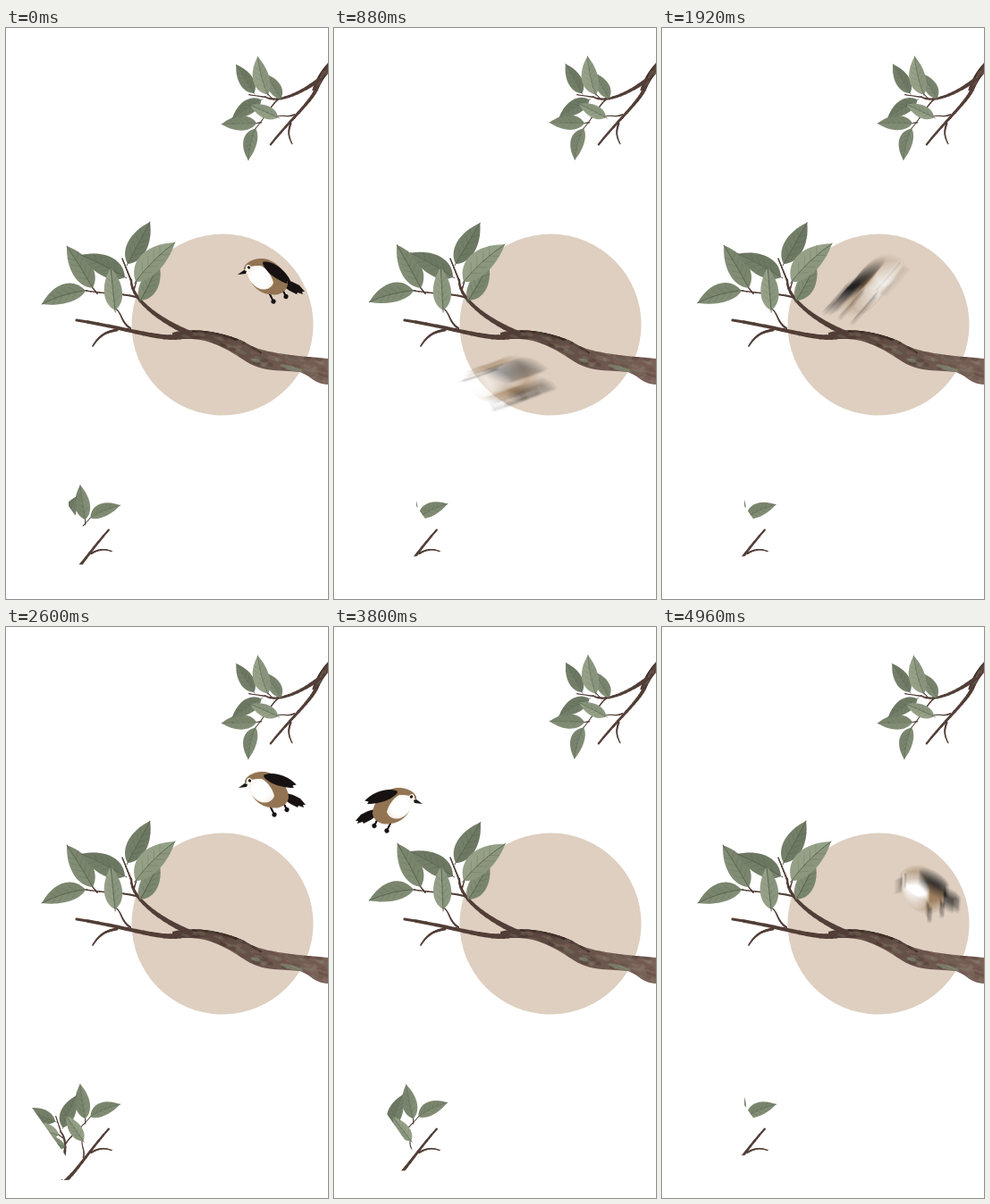
These frames come from a looping animation (360x639 px, 5000 ms). An HTML page with a canvas:

```html
<!DOCTYPE html>
<html lang="en">
<head>
<meta charset="utf-8">
<title>Bird and branches</title>
<style>
html, body { margin: 0; width: 100%; height: 100%; overflow: hidden; background: #fff; }
canvas { display: block; width: 360px; height: 639px; }
</style>
</head>
<body>
<canvas id="stage" width="360" height="639"></canvas>
<script>
const LOOP = 5000, STEP = 40, FLAP = 200, SHUTTER = 20;
const FIRST = 733, CYCLE = 1047, FLIGHT = 240;
const BARK = '#523e37', INK = '#171211';
const GREENS = ['#828d75', '#747f69', '#95a087'];
const ctx = document.getElementById('stage').getContext('2d');

function layer(w, h) {
  const c = document.createElement('canvas');
  c.width = w;
  c.height = h;
  return c.getContext('2d');
}

function fill(g, path, color) {
  g.fillStyle = color;
  g.fill(new Path2D(path));
}

function dot(g, x, y, rx, color, ry = rx) {
  g.fillStyle = color;
  g.beginPath();
  g.ellipse(x, y, rx, ry, .3, 0, 7);
  g.fill();
}

function random(seed) {
  return () => (seed = seed * 16807 % 2147483647) / 2147483647;
}

// Tapering twig: a cubic curve drawn with a shrinking line.
function limb(g, [x0, y0, x1, y1, x2, y2, x3, y3], w0, w1, color = BARK) {
  const n = 14;
  const at = (u, a, b, c, d) => {
    const v = 1 - u;
    return v * v * v * a + 3 * v * u * (v * b + u * c) + u * u * u * d;
  };
  g.strokeStyle = color;
  g.lineCap = 'round';
  for (let i = 0; i < n; i++) {
    g.lineWidth = w0 + (w1 - w0) * i / n;
    g.beginPath();
    for (const u of [i / n, (i + 1) / n]) g.lineTo(at(u, x0, x1, x2, x3), at(u, y0, y1, y2, y3));
    g.stroke();
  }
}

function twig(g, x0, y0, x1, y1, w0, w1, color) {
  limb(g, [x0, y0, x0, y0, x1, y1, x1, y1], w0, w1, color);
}

// base x, base y, tip x, tip y, sideways bend
const LEAVES = [
  [150, 305, 171, 262, 2], [136, 264, 161, 217, 0], [145, 284, 189, 240, -5],
  [97, 291, 68, 244, 1], [133, 279, 84, 254, 2], [122, 316, 117, 268, 0],
  [89, 294, 40, 309, 5]
];

function leaf([bx, by, tx, ty, bend], turn, color) {
  const len = Math.hypot(tx - bx, ty - by), w = len * .21;
  const mid = [len * .5, bend];
  const half = side => {
    const p = new Path2D();
    p.moveTo(0, 0);
    p.bezierCurveTo(len * .18, side * w * 1.35 + bend, len * .62, side * w * 1.3 + bend, len, 0);
    p.quadraticCurveTo(...mid, 0, 0);
    return p;
  };
  const upper = half(-1), lower = half(1);
  ctx.save();
  ctx.translate(bx, by);
  ctx.rotate(Math.atan2(ty - by, tx - bx) + turn);
  ctx.fillStyle = color;
  ctx.fill(upper);
  ctx.fill(lower);
  ctx.fillStyle = 'rgba(50,60,45,.1)';
  ctx.fill(lower);
  ctx.strokeStyle = 'rgba(60,72,54,.35)';
  ctx.lineWidth = .5;
  ctx.beginPath();
  for (let u = .2; u < .8; u += .15) {
    for (const side of [-1, 1]) {
      ctx.moveTo(len * u, bend * 2 * u * (1 - u));
      ctx.lineTo(len * (u + .13), side * w * .6 + bend * .5);
    }
  }
  ctx.stroke();
  ctx.strokeStyle = '#56624e';
  ctx.lineWidth = .9;
  ctx.beginPath();
  ctx.moveTo(-2, 0);
  ctx.quadraticCurveTo(...mid, len, 0);
  ctx.stroke();
  ctx.restore();
}

function leafyFork(sway) {
  limb(ctx, [206, 342, 170, 327, 139, 302, 140, 282], 6, 2);
  twig(ctx, 140, 283, 130, 258, 2, 1.2);
  limb(ctx, [148, 302, 135, 297, 115, 298, 89, 294], 2.2, 1.2);
  twig(ctx, 102, 297, 97, 291, 1.5, 1);
  twig(ctx, 143, 293, 146, 283, 1.5, 1);
  limb(ctx, [139, 336, 128, 329, 130, 318, 121, 313], 2.2, 1);
  LEAVES.forEach((l, i) => leaf(l, .06 * sway, GREENS[i % 3]));
}

const TRUNK = new Path2D('M186 341C205 335 240 339 266 351C284 364 318 366 360 370V399' +
  'C343 398 342 389 328 385C304 382 286 386 265 371C248 359 225 347 205 348L186 348Z');

function bareFork() {
  limb(ctx, [200, 344, 178, 352, 138, 336, 79, 327], 6, 3);
  limb(ctx, [124, 338, 110, 340, 103, 346, 97, 356], 3, 1.6);
  const tone = ctx.createLinearGradient(190, 0, 360, 0);
  tone.addColorStop(0, BARK);
  tone.addColorStop(1, '#7b655b');
  ctx.save();
  ctx.fillStyle = tone;
  ctx.fill(TRUNK);
  ctx.clip(TRUNK);
  limb(ctx, [210, 338, 245, 341, 262, 349, 285, 363], 5, 2, '#3a2925');
  const rnd = random(41);
  const tints = ['rgba(160,136,120,.22)', 'rgba(56,36,32,.25)', 'rgba(104,70,62,.3)', 'rgba(140,160,132,.2)'];
  for (let i = 0; i < 140; i++) {
    const u = rnd(), y = 342 + 44 * u + (rnd() - .5) * 26;
    dot(ctx, 200 + 160 * u, y, 2 + rnd() * 5, tints[i % 4], 1 + rnd() * 1.5);
  }
  dot(ctx, 279, 372, 5, 'rgba(135,163,135,.45)', 2);
  dot(ctx, 319, 381, 13, 'rgba(135,163,135,.45)', 2.5);
  ctx.restore();
}

// The same branch again: turned and smaller at the top, that one mirrored at the bottom.
function toTop() {
  ctx.translate(67, 63);
  ctx.rotate(-Math.PI / 3);
  ctx.scale(.709, .709);
}

function toBottom() {
  const a = 80 * Math.PI / 180, c = Math.cos(a), s = Math.sin(a);
  ctx.transform(c, s, s, -c, -65, 293);
  toTop();
}

function branch(place, draw) {
  ctx.save();
  place();
  draw();
  ctx.restore();
}

function clip(...corners) {
  ctx.beginPath();
  for (const [x, y] of corners) ctx.lineTo(x, y);
  ctx.clip();
}

// The lower branch is cut along a slanted edge for the leaves and a level one for the twig.
function lowerBranch(cut, sway) {
  const end = 630 - .42 * cut;
  branch(() => {
    clip([0, 500], [360, 500], [360, end], [0, end]);
    toBottom();
  }, bareFork);
  branch(() => {
    clip([cut, 500], [cut, 535], [cut + 73, 639], [360, 639], [360, 500]);
    toBottom();
  }, () => leafyFork(sway));
}

// Hovering places, side faced, bend of the way out, flap phase, cut of the lower branch
const STOPS = [
  { x: 297, y: 283, face: 1, bend: [310, 400], phase: 0, cut: 70 },
  { x: 55, y: 431, face: -1, bend: [222, 336], phase: .4, cut: -100 },
  { x: 298, y: 190, face: 1, bend: [180, 215], phase: .45, cut: 27 },
  { x: 61, y: 208, face: -1, bend: [170, 300], phase: .45, cut: 52 }
];
const FLYING_CUT = 92;

function pose(t) {
  const i = Math.max(0, Math.floor((t - FIRST - FLIGHT) / CYCLE) + 1);
  const a = STOPS[i % 4], b = STOPS[(i + 1) % 4];
  const u = Math.max(0, (t - FIRST - i * CYCLE) / FLIGHT), s = u * u * (3 - 2 * u);
  const way = (p, c, q) => p * (1 - s) ** 2 + 2 * c * s * (1 - s) + q * s * s;
  const flap = Math.cos(2 * Math.PI * (t / FLAP + a.phase));
  return {
    x: way(a.x, a.bend[0], b.x),
    y: way(a.y, a.bend[1], b.y) - 1.6 * (1 - flap),
    face: u > .8 ? b.face : a.face,
    cut: u > 0 ? FLYING_CUT : a.cut,
    flap, moving: u > 0
  };
}

const birdLayer = layer(110, 90), blurLayer = layer(360, 639);

function drawBird(flap) {
  const g = birdLayer;
  g.setTransform(1, 0, 0, 1, 0, 0);
  g.clearRect(0, 0, 110, 90);
  g.translate(55, 45);
  for (const [x, y] of [[2, 23], [16, 17.5]]) {
    twig(g, x - 5, y - 10, x, y, 1.8, 1.8, INK);
    dot(g, x, y, 2.6, INK);
  }
  fill(g, 'M12-2L23 1L31 5L37 12L34 12L35 15L29 13L28 15L20 11L13 6Z', INK);
  fill(g, 'M-31-12C-32-20-20-26-9-25C6-23 18-8 18 4C16 14 6 17-3 15C-14 14-23 5-26-6Z', '#927453');
  const chest = g.createRadialGradient(-13, -4, 9, -13, -4, 18);
  chest.addColorStop(0, '#fff');
  chest.addColorStop(1, '#f6ede3');
  fill(g, 'M-31-11C-28-17-17-17-12-17C-4-13 1-3 2 2C0 8-6 11-13 9C-22 5-25-1-27-7Z', chest);
  dot(g, -26, -15, 2.9, '#fff');
  dot(g, -25.5, -15, 1.7, INK);
  fill(g, 'M-38-7L-31-12L-28-11L-29-8Z', INK);
  g.translate(-9, -20);
  g.rotate((23 + 10 * flap) * Math.PI / 180);
  fill(g, 'M-1-1C7-8 26-7 37 1L33 3L35 5C28 7 13 8 5 4C0 2-1 1-1-1Z', INK);
}

function stamp(g, x, y, face) {
  g.save();
  g.translate(x, y);
  g.scale(face, 1);
  g.drawImage(birdLayer.canvas, -55, -45);
  g.restore();
}

function bird(t, now) {
  const g = blurLayer, n = 16;
  drawBird(now.flap);
  if (!now.moving) return stamp(ctx, now.x, now.y, now.face);
  g.clearRect(0, 0, 360, 639);
  g.globalCompositeOperation = 'lighter';
  g.globalAlpha = 1 / n;
  for (let i = 0; i < n; i++) {
    const p = pose(t + ((i + .5) / n - .5) * SHUTTER);
    stamp(g, p.x, p.y, now.face);
  }
  ctx.drawImage(g.canvas, 0, 0);
}

function render(t) {
  const now = pose(t), sway = (1 - Math.cos(4 * Math.PI * t / LOOP)) / 2;
  const whole = () => {
    bareFork();
    leafyFork(sway);
  };
  ctx.fillStyle = '#fff';
  ctx.fillRect(0, 0, 360, 639);
  dot(ctx, 242, 332, 101.5, '#decfc0');
  branch(() => {}, whole);
  branch(toTop, whole);
  lowerBranch(now.cut, sway);
  bird(t, now);
}

const start = performance.now();
function tick() {
  const t = (performance.now() - start) % LOOP;
  render(Math.floor(t / STEP) * STEP);
  requestAnimationFrame(tick);
}
tick();
</script>
</body>
</html>
```
